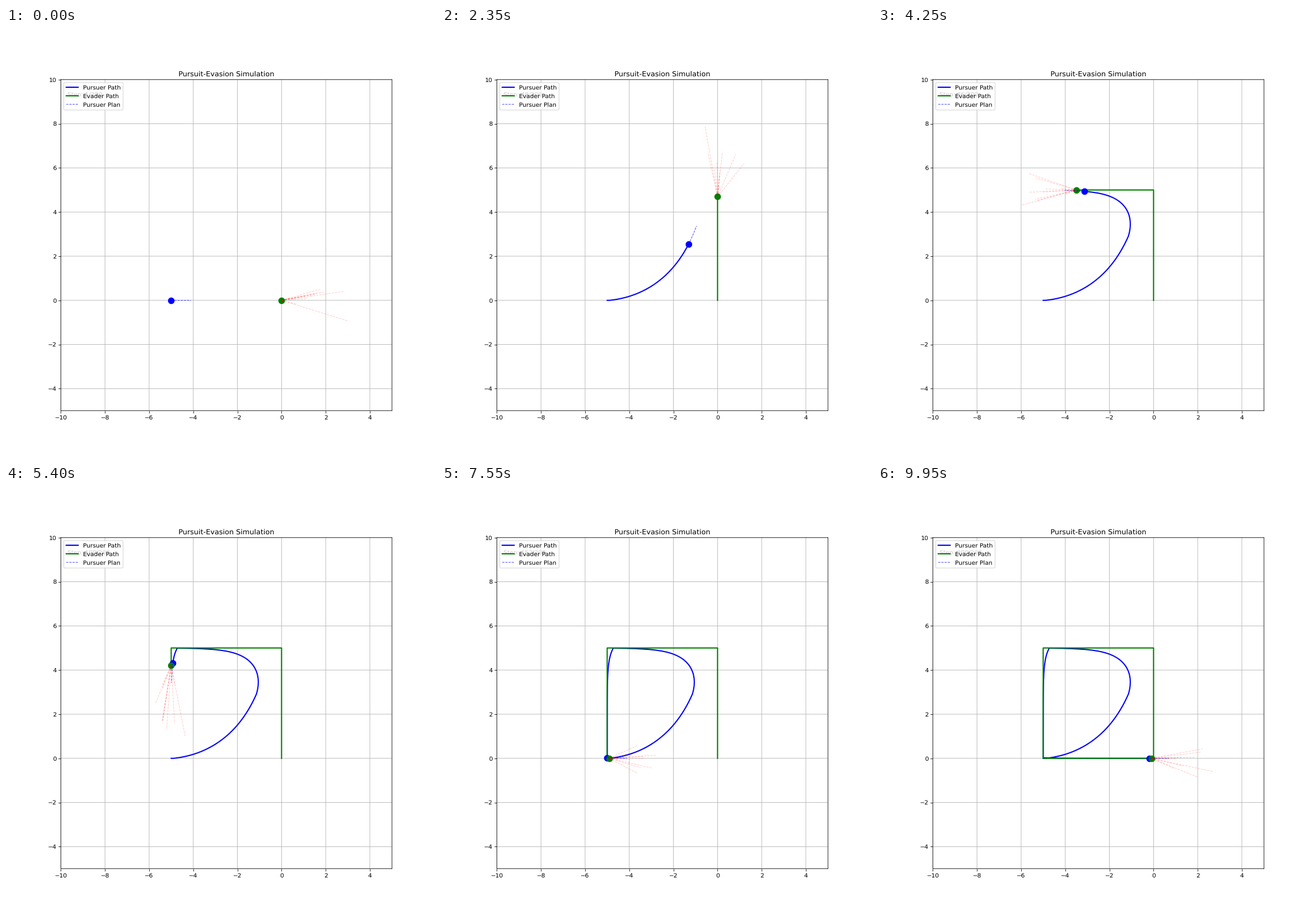
A matplotlib script for the animation above (10 s loop, 748x748 px).

```python
import numpy as np
import matplotlib.pyplot as plt
from matplotlib.animation import FuncAnimation

STEPS = 200
SPEED = 0.1
HORIZON = 10      # points in the pursuer's plan
LEAD = 0.45       # aim ahead of the evader by half the plan's length
SAMPLES = 10

# Thin lines and glyphs keep their sub-pixel places.
plt.rcParams["path.snap"] = False
plt.rcParams["text.hinting"] = "none"


def evader_track():
    """Once around a square with sides of 5, starting upward from the origin."""
    dist = SPEED * np.arange(STEPS)
    corners = np.arange(0, 21, 5)
    return np.column_stack([np.interp(dist, corners, [0, 0, -5, -5, 0]),
                            np.interp(dist, corners, [0, 5, 5, 0, 0])])


def evader_headings(track):
    """Direction of the last move; it faces right before it starts."""
    moves = np.diff(track, axis=0) / SPEED
    return np.vstack([[1, 0], moves])


def chase(pos, target, heading):
    """One pursuer step towards a point ahead of the target."""
    aim = target + LEAD * heading - pos
    return pos + SPEED * aim / np.hypot(*aim)


def pursuer_track():
    track = [np.array([-5.0, 0.0])]
    for target, heading in zip(evader[:-1], headings[:-1]):
        track.append(chase(track[-1], target, heading))
    return np.array(track)


def plan_from(i):
    """The chase continued against an evader that keeps its heading."""
    points = [pursuer[i]]
    for k in range(HORIZON - 1):
        target = evader[i] + k * SPEED * headings[i]
        points.append(chase(points[-1], target, headings[i]))
    return np.array(points)


def fan(i):
    """Random guesses of the evader's coming moves, as end points."""
    rng = np.random.default_rng(100 + i)
    angle = np.arctan2(*headings[i][::-1]) + rng.normal(0, 0.26, SAMPLES)
    reach = np.clip(rng.normal(1.6, 0.7, SAMPLES), 0.4, 3.3)
    return evader[i] + np.column_stack([reach * np.cos(angle),
                                        reach * np.sin(angle)])


evader = evader_track()
headings = evader_headings(evader)
pursuer = pursuer_track()

fig, ax = plt.subplots(figsize=(10, 10), dpi=74.8)
ax.set_xlim(-10, 5)
ax.set_ylim(-5, 10)
ax.set_aspect("equal")
ax.set_xticks(range(-10, 5, 2))
ax.set_yticks(range(-4, 11, 2))
ax.grid(True)
ax.set_title("Pursuit-Evasion Simulation")


def line(style, **kwargs):
    return ax.plot([], [], style, **kwargs)[0]


pursuer_path = line("b-", lw=2, label="Pursuer Path")
evader_path = line("g-", lw=2, label="Evader Path")
pursuer_dot = line("bo", ms=10)
evader_dot = line("go", ms=10)
plan = line("b--", lw=1, alpha=0.7, label="Pursuer Plan")
rays = [line("r--", lw=1, alpha=0.2) for _ in range(SAMPLES)]
counter = ax.text(0.02, 0.95, "", transform=ax.transAxes)
ax.legend(loc="upper left")


def draw(i):
    pursuer_path.set_data(*pursuer[:i + 1].T)
    evader_path.set_data(*evader[:i + 1].T)
    pursuer_dot.set_data(*pursuer[i:i + 1].T)
    evader_dot.set_data(*evader[i:i + 1].T)
    plan.set_data(*plan_from(i).T)
    for ray, end in zip(rays, fan(i)):
        ray.set_data(*np.array([evader[i], end]).T)
    counter.set_text(f"Step: {i + 1}/{STEPS}")
    return [pursuer_path, evader_path, pursuer_dot, evader_dot, plan, *rays, counter]


anim = FuncAnimation(fig, draw, frames=STEPS, interval=50, repeat=True)
plt.show()
```
